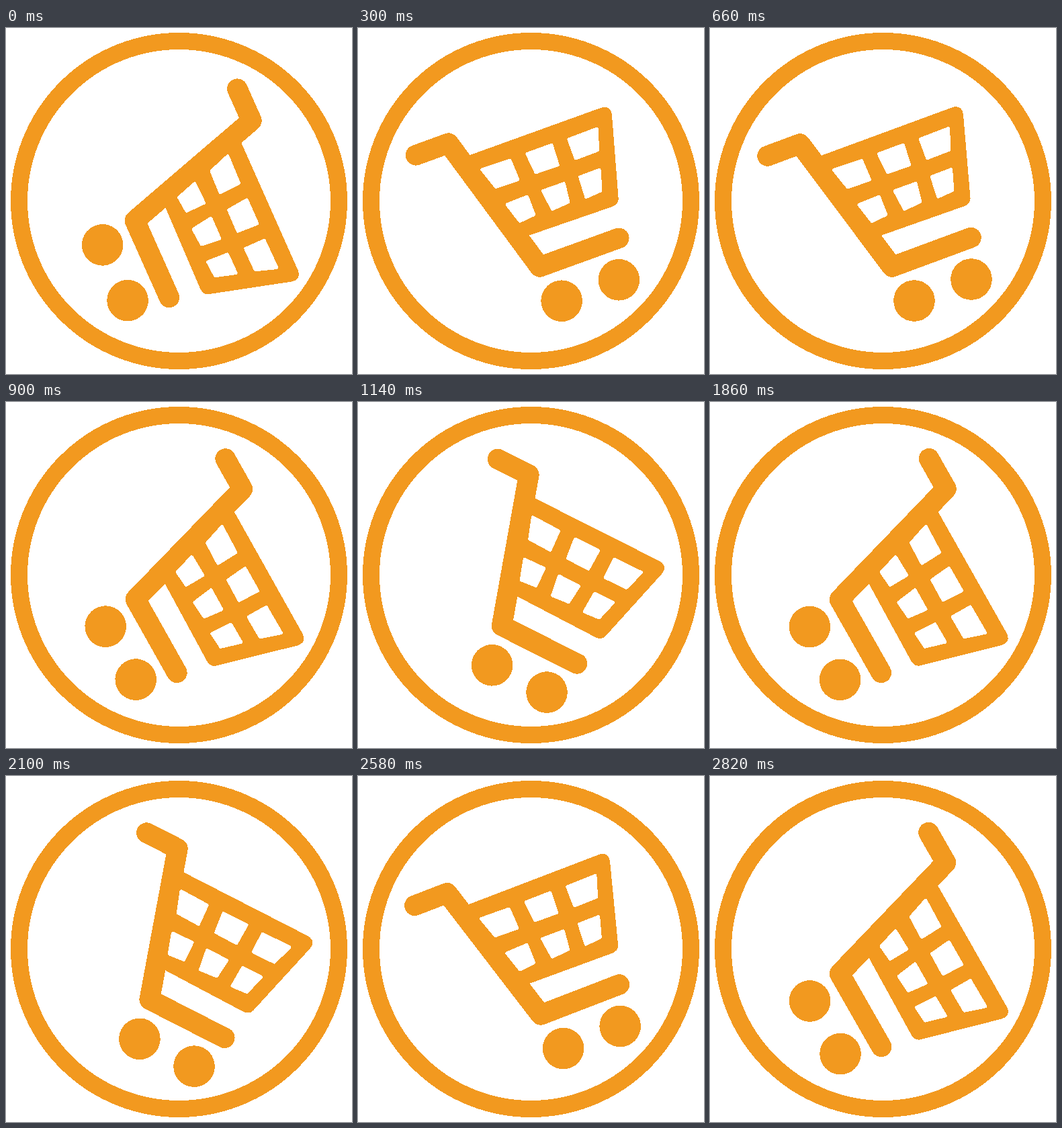
An HTML page for the animation above (2.88 s loop, 515 by 515 pixels).

```html
<!DOCTYPE html>
<html lang="en">
<head>
<meta charset="utf-8">
<title>Swinging cart</title>
<style>
  html, body { margin: 0; height: 100%; overflow: hidden; background: #fff; }
  svg { display: block; width: 100%; height: 100%; shape-rendering: crispEdges; }
  .line { fill: none; stroke: #f2991f; stroke-linecap: round; stroke-linejoin: round; }
  .solid { fill: #f2991f; }
  .hole { fill: #fff; stroke: #fff; stroke-width: 5; stroke-linejoin: round; }
</style>
</head>
<body>
<svg viewBox="0 0 515 515">
  <circle class="line" cx="257.5" cy="257.5" r="238" stroke-width="25"/>
  <g id="cart">
    <path class="solid" d="M160 192L361 118Q375 114 377 129L387.5 253Q388 261 379 265L240 314Z"/>
    <path class="line" stroke-width="30.5" d="M85.5 190.5L134 172.5L271 355.5L388.5 312"/>
    <path class="hole" d="M184.5 211.5L225.5 197.5L237.5 225.8L205 236.8Z
      M251.3 187.5L287.2 174.2L296.7 203.5L264.5 214.8Z
      M313.3 165.5L354.6 149.6L355.8 181.2L323.6 193.6Z
      M222 263.2L251.4 251.3L261.7 277.7L241 287.6Z
      M275.2 242.6L306 231.5L312.8 258.6L289.5 269.3Z
      M330.3 221.5L358.6 210.7L360.8 241.4L339.6 251Z"/>
    <circle class="solid" cx="304" cy="406" r="30.8"/>
    <circle class="solid" cx="389" cy="374" r="30.8"/>
  </g>
</svg>
<script>
  const LOOP = 2880, STEP = 60, SWING = 961;
  const cart = document.getElementById('cart');

  // A near-sine swing, slightly sharper at its turning points.
  function angleAt(ms) {
    const phase = 2 * Math.PI * ms / SWING;
    return 23.4 + 62.15 * Math.cos(phase) + 0.7 * Math.cos(3 * phase);
  }

  function draw() {
    const ms = Math.floor(performance.now() % LOOP / STEP) * STEP;
    cart.setAttribute('transform', `rotate(${angleAt(ms)} 268.2 278.8)`);
    requestAnimationFrame(draw);
  }
  draw();
</script>
</body>
</html>
```
